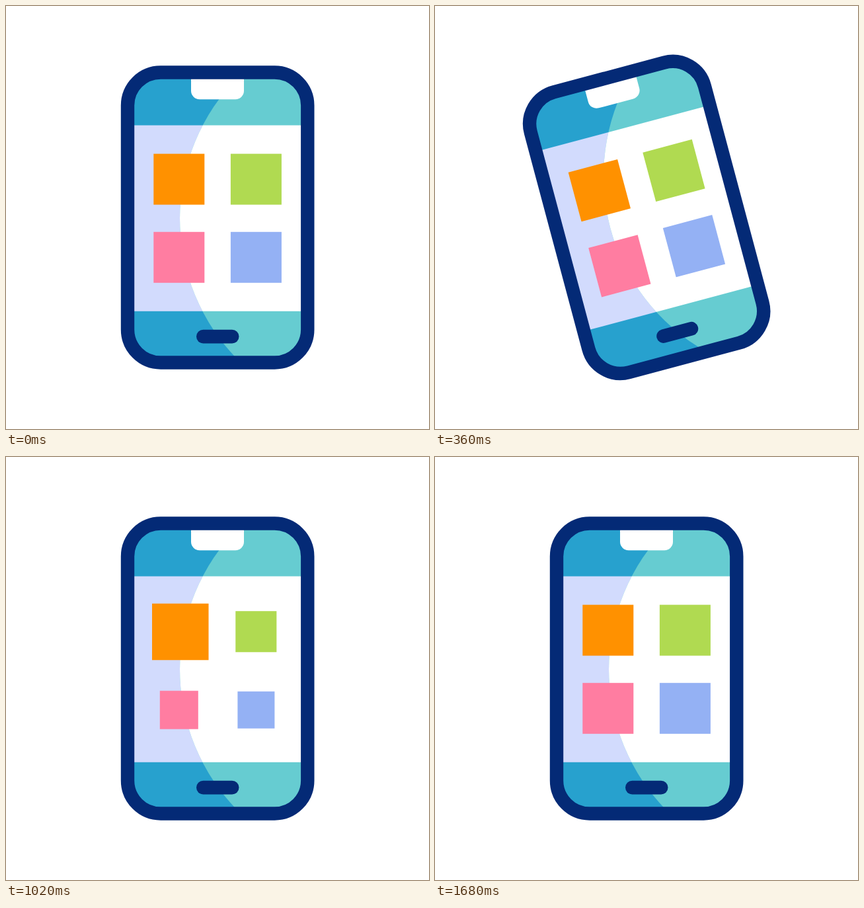
Animation, 640 px wide and 640 px high, one loop 1800 ms. Source, as an HTML page:

```html
<!DOCTYPE html>
<html>
<head>
<meta charset="utf-8">
<style>
html, body { margin: 0; height: 100%; overflow: hidden; background: #fff; }
svg { display: block; width: 100%; height: 100%; }
</style>
</head>
<body>
<svg viewBox="0 0 640 640">
  <defs>
    <clipPath id="screen"><rect x="193" y="109.5" width="254" height="421" rx="41"/></clipPath>
    <clipPath id="lit"><circle cx="567" cy="321.5" r="304"/></clipPath>
  </defs>
  <g id="phone">
    <g clip-path="url(#screen)">
      <rect x="190" y="100" width="260" height="440" fill="#27a1ce"/>
      <rect x="190" y="180.5" width="260" height="281.3" fill="#d2dbfd"/>
      <g clip-path="url(#lit)">
        <rect x="190" y="100" width="260" height="440" fill="#66ccd1"/>
        <rect x="190" y="180.5" width="260" height="281.3" fill="#fff"/>
      </g>
      <rect x="280" y="90" width="80" height="51.3" rx="13" fill="#fff"/>
    </g>
    <rect x="184" y="100.5" width="272.3" height="439" rx="50" fill="none" stroke="#042a76" stroke-width="20.4"/>
    <rect x="288" y="489.7" width="64.5" height="20.8" rx="10.4" fill="#042a76"/>
    <g id="tiles"></g>
  </g>
  <g id="sparks" stroke="#ffce54" stroke-linecap="round"></g>
</svg>
<script>
const LOOP = 1800, REST = 77, BIG = 86;
const LEFT = 261.8, RIGHT = 378.4, TOP = 262.1, BOTTOM = 380.3;
const $ = id => document.getElementById(id);

function set(el, attrs) {
  for (const k in attrs) el.setAttribute(k, attrs[k]);
}
function add(parent, tag, attrs = {}) {
  const el = document.createElementNS("http://www.w3.org/2000/svg", tag);
  set(el, attrs);
  parent.append(el);
  return el;
}
function ease(t, from, to) {
  const p = Math.min(1, Math.max(0, (t - from) / (to - from)));
  return (1 - Math.cos(Math.PI * p)) / 2;
}
// Rises from 0 to 1 between a and b, falls back between c and d
const pulse = (t, [a, b, c, d]) => ease(t, a, b) - ease(t, c, d);

// While the apps are in use every tile is small, except the one whose turn it is
const IN_USE = [460, 640, 1520, 1680];
const tiles = [
  { fill: "#ff9100", x: LEFT, y: TOP, small: 60, turn: [670, 820, 1000, 1240], drift: [2, 0] },
  { fill: "#b0da51", x: RIGHT, y: TOP, small: 60, turn: [990, 1160, 1180, 1380], drift: [-1, -3.5] },
  { fill: "#ff7da1", x: LEFT, y: BOTTOM, small: 58, turn: [1220, 1380, 1520, 1680], drift: [0, 0] },
  { fill: "#94b1f4", x: RIGHT, y: BOTTOM, small: 56, turn: [460, 640, 640, 820], drift: [0, 0] }
];
for (const tile of tiles) tile.el = add($("tiles"), "rect", { fill: tile.fill });

function drawTile(t, { el, x, y, small, turn, drift }) {
  const used = pulse(t, IN_USE), grown = pulse(t, turn);
  const size = REST + (small - REST) * used + (BIG - small) * grown;
  set(el, {
    x: x + drift[0] * grown - size / 2,
    y: y + 2.4 * used + drift[1] * grown - size / 2,
    width: size, height: size
  });
}

// A pair of strokes that shoots outwards, then runs out at its far end
const bursts = [
  { x: 117.5, dir: -1, time: [600, 720, 720, 820] },
  { x: 518.5, dir: 1, time: [1030, 1110, 1110, 1210] },
  { x: 117.5, dir: -1, time: [1530, 1600, 1600, 1680] }
];
for (const b of bursts) b.lines = [-1, 1].map(() => add($("sparks"), "line"));

function drawBurst(t, { x, dir, time: [start, full, leave, end], lines }) {
  const head = ease(t, start, full), tail = ease(t, leave, end);
  const width = 19.4 * Math.min(1, 4 * (head - tail));
  lines.forEach((el, i) => {
    const side = i ? 1 : -1;
    const y = p => 316.2 + side * (31.2 + 13.2 * p);
    set(el, {
      x1: x + dir * 20 * tail, y1: y(tail),
      x2: x + dir * 20 * head, y2: y(head),
      "stroke-width": width,
      visibility: width > 0.01 ? "visible" : "hidden"
    });
  });
}

function draw(t) {
  const angle = 18 * (ease(t, 81, 231) - 2 * ease(t, 231, 391) + ease(t, 391, 541));
  set($("phone"), { transform: `rotate(${angle} 320 320)` });
  for (const tile of tiles) drawTile(t, tile);
  for (const b of bursts) drawBurst(t, b);
}

function tick() {
  draw(performance.now() % LOOP);
  requestAnimationFrame(tick);
}
tick();
</script>
</body>
</html>
```
